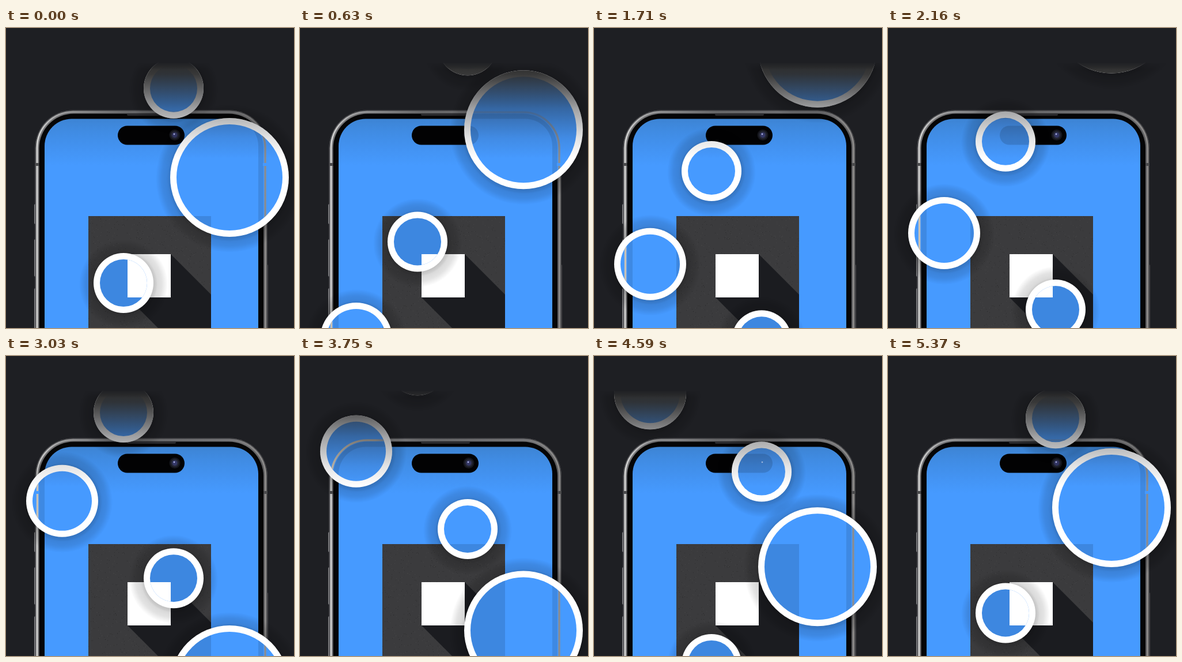
Animation of 500 by 520 pixels, one loop 5400 ms. Source, as an HTML page with a canvas:

```html
<!DOCTYPE html>
<html lang="en">
<head>
<meta charset="utf-8">
<title>Floating rings</title>
<style>
html, body { margin: 0; width: 100%; height: 100%; overflow: hidden; background: #1e1f23; }
canvas { display: block; width: 500px; height: 520px; }
</style>
</head>
<body>
<canvas id="stage" width="500" height="520"></canvas>
<script>
const W = 500, H = 520, LOOP = 5400, STEP = 30;
const BLUE = '#469aff', CUT = 60, RIM = 11;

// x, radius, y at the start of the loop, distance risen per loop
const rings = [
  { x: 291, r: 52, y: 104.7, rise: 639 },
  { x: 204, r: 52, y: 442, rise: 613 },
  { x: 97.5, r: 62.5, y: 613.8, rise: 646 },
  { x: 388, r: 103, y: 259, rise: 708.5 }
];

function layer() {
  const c = document.createElement('canvas');
  c.width = W;
  c.height = H;
  return c.getContext('2d');
}

function box(c, x, y, w, h, r, fill) {
  c.beginPath();
  c.roundRect(x, y, w, h, r);
  c.fillStyle = fill;
  c.fill();
}

function outline(c, x, y, w, r, width, color) {
  c.beginPath();
  c.roundRect(x, y, w, 600, r);
  c.lineWidth = width;
  c.strokeStyle = color;
  c.stroke();
}

function disc(c, x, y, r, fill) {
  c.beginPath();
  c.arc(x, y, r, 0, Math.PI * 2);
  c.fillStyle = fill;
  c.fill();
}

function ramp(c, x0, y0, x1, y1, stops) {
  const g = c.createLinearGradient(x0, y0, x1, y1);
  stops.forEach(([at, color]) => g.addColorStop(at, color));
  return g;
}

const bezel = (c, fill) => box(c, 57.5, 148.5, 389.5, 600, 60, fill);
const screen = (c, fill) => box(c, 67, 157.5, 371, 600, 47, fill);
const notch = (c, fill) => box(c, 194, 169.5, 116, 33, 16.5, fill);
const card = (c, fill) => box(c, 143, 326, 213, 194, 0, fill);
const badge = c => box(c, 211, 392, 75, 75, 0, '#fff');

function drawCard(c) {
  card(c, '#3b3b3d');
  let seed = 7;
  const rnd = () => (seed = seed * 16807 % 2147483647) / 2147483647;
  for (let i = 0; i < 900; i++) {
    c.fillStyle = rnd() < .6 ? 'rgba(0,0,0,.2)' : 'rgba(255,255,255,.05)';
    c.fillRect(143 + Math.floor(rnd() * 213), 326 + Math.floor(rnd() * 194), 1, 1);
  }
  c.beginPath();
  [[211, 467], [264, 520], [356, 520], [356, 462], [286, 392]].forEach(p => c.lineTo(...p));
  c.fillStyle = '#1b1c20';
  c.fill();
  badge(c);
}

function drawPhone() {
  const c = layer();
  c.fillStyle = '#1e1f23';
  c.fillRect(0, 0, W, H);

  [[305, 35], [366, 65], [451, 80]].forEach(([y, h]) => box(c, 49, y, 4, h, 2, '#8a8a8c'));
  box(c, 452, 410, 3, 130, 2, '#4b4b4e');

  const steel = ramp(c, 50, 0, 454, 0,
    [[0, '#77777a'], [.12, '#737375'], [.5, '#58585a'], [.9, '#707072'], [1, '#59595b']]);
  box(c, 50.5, 142.5, 403.5, 600, 66, steel);
  const shine = ramp(c, 50, 0, 454, 0,
    [[0, '#dcdcda'], [.1, '#a4a4a5'], [.4, '#69696b'], [.85, '#77777a'], [1, '#918f8d']]);
  outline(c, 54, 145.5, 396.5, 62, 2.5, shine);
  outline(c, 51, 143, 402.5, 65.5, 1, '#3b3b3e');
  c.fillStyle = '#4a4a4c';
  c.fillRect(51, 234, 7, 5);
  c.fillRect(447, 234, 7, 5);
  bezel(c, '#050506');
  box(c, 210, 148, 85, 4, 2, '#2c2c2f');

  screen(c, ramp(c, 0, 157, 0, 238,
    [[0, '#3d84d4'], [.3, '#408ce4'], [.65, '#4393f2'], [1, BLUE]]));

  notch(c, '#020203');
  disc(c, 293, 185.5, 9.5, '#15161c');
  disc(c, 293, 185.5, 7, '#252735');
  disc(c, 293, 185.5, 4.5, '#343766');
  disc(c, 292, 184, 1.4, '#a9aee0');

  drawCard(c);
  return c.canvas;
}

// What shows through the blue glass of a ring
function drawGhost() {
  const c = layer();
  bezel(c, 'rgba(0,0,0,.11)');
  c.globalCompositeOperation = 'destination-out';
  screen(c, '#000');
  c.globalCompositeOperation = 'source-over';
  outline(c, 54.5, 146, 395.5, 62, 3.5, ramp(c, 50, 0, 454, 0,
    [[0, '#c9c3b8'], [.2, '#b5aca0'], [.3, 'rgba(120,130,150,.3)'],
     [.9, 'rgba(120,130,150,.4)'], [1, '#8f8c8a']]));
  c.clearRect(50, 234, 8, 5);
  c.clearRect(446, 234, 8, 5);
  notch(c, 'rgba(0,0,0,.14)');
  disc(c, 292, 184, 1.3, '#b8d4ff');
  card(c, 'rgba(0,0,0,.12)');
  badge(c);
  return c.canvas;
}

const stage = document.getElementById('stage').getContext('2d');
const phone = drawPhone(), ghost = drawGhost(), glass = layer();

const haze = ramp(glass, 0, 66, 0, 226, [
  [0, 'rgb(46,46,46)'], [.09, 'rgba(46,46,46,.95)'], [.24, 'rgba(44,44,45,.75)'],
  [.46, 'rgba(30,32,36,.42)'], [.78, 'rgba(30,32,36,.12)'], [1, 'rgba(30,32,36,0)']
]);
const fade = ramp(glass, 0, CUT, 0, 72, [[0, 'rgba(0,0,0,.9)'], [1, 'rgba(0,0,0,0)']]);

function halo(c, x, y, r, size, alpha) {
  const g = c.createRadialGradient(x, y, r - 2, x, y, r + size);
  g.addColorStop(0, `rgba(0,0,0,${alpha})`);
  g.addColorStop(.6, `rgba(0,0,0,${alpha * .6})`);
  g.addColorStop(1, 'rgba(0,0,0,0)');
  disc(c, x, y, r + size, g);
}

function drawRing(c, { x, r }, y) {
  halo(c, x, y + 2, r, 25, .18);
  halo(c, x + 1, y + 2, r, 6, .08);
  disc(c, x, y, r, '#fff');
  c.save();
  disc(c, x, y, r - RIM, BLUE);
  c.clip();
  c.drawImage(ghost, 0, 0);
  c.restore();
  disc(c, x, y, r, haze);
}

function render(time) {
  const p = Math.floor(time % LOOP / STEP) * STEP / LOOP;
  glass.clearRect(0, 0, W, H);
  for (const ring of rings) {
    let y = ring.y - ring.rise * p;
    if (y < 46 - ring.r) y += ring.rise;
    drawRing(glass, ring, y);
  }
  glass.clearRect(0, 0, W, CUT);
  glass.globalCompositeOperation = 'destination-out';
  glass.fillStyle = fade;
  glass.fillRect(0, CUT, W, 12);
  glass.globalCompositeOperation = 'source-over';

  stage.drawImage(phone, 0, 0);
  stage.drawImage(glass.canvas, 0, 0);
}

const start = performance.now();
function tick() {
  render(performance.now() - start);
  requestAnimationFrame(tick);
}
tick();
</script>
</body>
</html>
```
